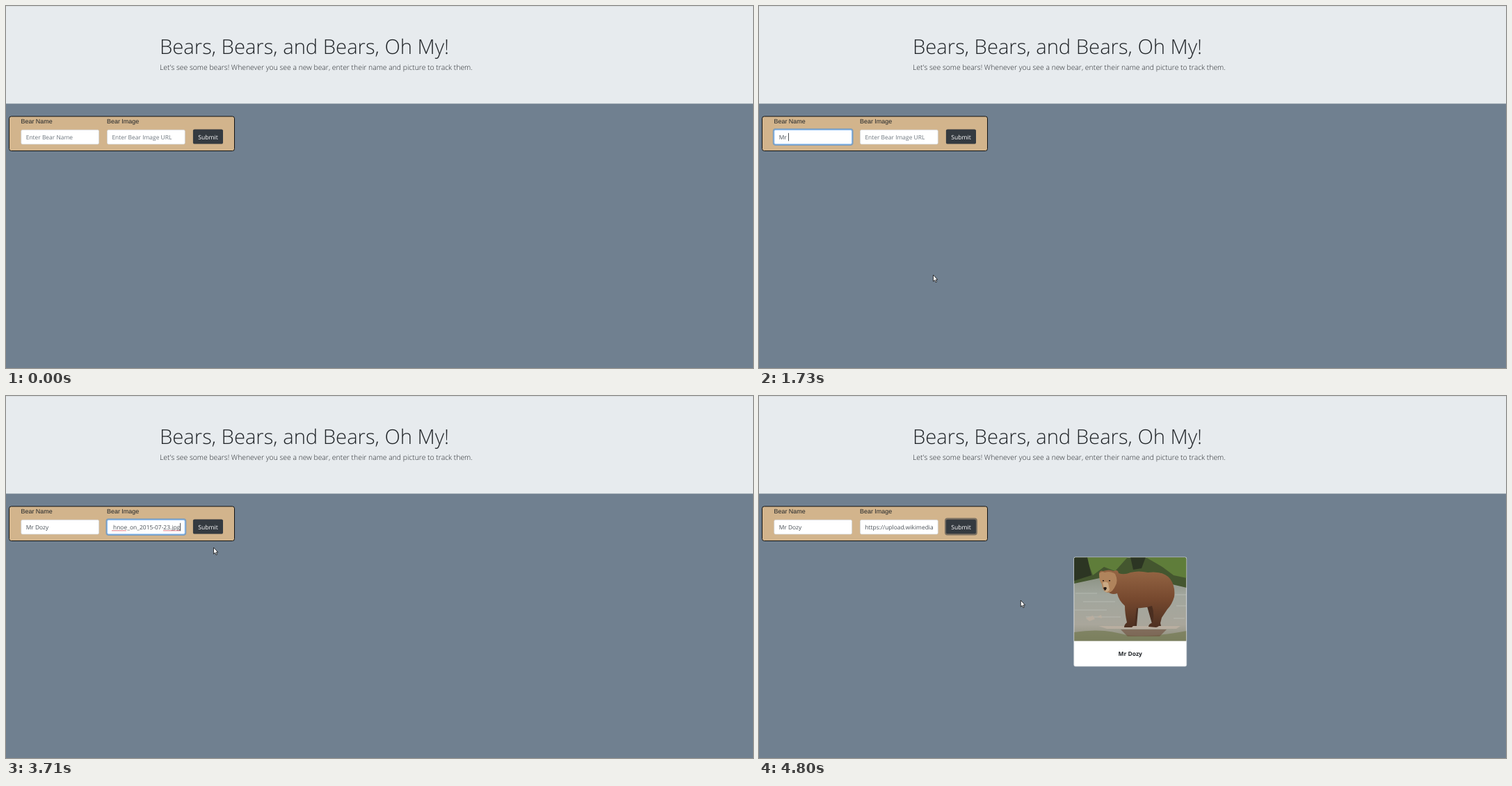
Animation of 1074 by 521 pixels, one loop 5320 ms. Source, as an HTML page:

```html
<!DOCTYPE html>
<html lang="en">
<head>
<meta charset="utf-8">
<title>Bear tracker</title>
<style>
  html, body { margin: 0; width: 100%; height: 100%; overflow: hidden; background: #708090; }
  svg { display: block; }
  text { font-family: "Open Sans", "Noto Sans", sans-serif; font-size: 8.45px; fill: #495057;
         white-space: pre; text-rendering: geometricPrecision; }
  .light { font-weight: 300; fill: #212529; }
  .label { font-family: "Liberation Sans", Arial, sans-serif; font-size: 8.95px; fill: #212529; }
  .hint { fill: #6c757d; }
  .field { fill: #fff; stroke: #ced4da; stroke-width: .7; }
  .ring { fill: none; stroke: #007bff; stroke-opacity: .4; stroke-width: 2; }
  .edge { fill: none; stroke: #80bdff; stroke-width: .8; }
  .caret { fill: #343a40; }
  .pointer { stroke: #111; stroke-width: .8; fill: #fff; stroke-linejoin: round; }
</style>
</head>
<body>
<svg width="1074" height="521" viewBox="0 0 1074 521">
  <defs>
    <clipPath id="photo"><path d="M453.2 352.5V234q0-1.6 1.6-1.6H612.600q1.600 0 1.600 1.600V352.500Z"/></clipPath>
    <linearGradient id="water" x2="0" y2="1">
      <stop offset="0" stop-color="#777f6b"/>
      <stop offset=".45" stop-color="#a1a69d"/>
      <stop offset=".8" stop-color="#a9a69b"/>
      <stop offset="1" stop-color="#8b8c79"/>
    </linearGradient>
    <linearGradient id="fur" x2="0" y2="1">
      <stop offset="0" stop-color="#946543"/>
      <stop offset=".5" stop-color="#77492f"/>
      <stop offset="1" stop-color="#4d3021"/>
    </linearGradient>
  </defs>

  <rect width="1074" height="521" fill="#708090"/>
  <rect width="1074" height="140.500" fill="#e7ebee"/>
  <rect width="1074" height="1" fill="#d9dde0"/>
  <text class="light" x="221" y="68.500" style="font-size:29.200px">Bears, Bears, and Bears, Oh My!</text>
  <text class="light" x="221" y="91.700" style="font-size:10.400px">Let's see some bears! Whenever you see a new bear, enter their name and picture to track them.</text>

  <rect x="4.500" y="158.900" width="324" height="49.600" rx="3" fill="#d2b48c" stroke="#111"/>
  <text class="label" x="21.500" y="169.400">Bear Name</text>
  <text class="label" x="145" y="169.400">Bear Image</text>

  <g id="name" transform="translate(21.500 178)"></g>
  <g id="link" transform="translate(145.200 178)"></g>
  <g id="marks" fill="none" stroke="#d04050" stroke-width=".7">
    <path d="M152 193.800H173M226 193.800H250"/>
  </g>

  <rect id="halo" x="268" y="176.600" width="44.900" height="23" rx="3" fill="none" stroke="#343a40" stroke-opacity=".55" stroke-width="2"/>
  <rect id="button" x="268.900" y="177.400" width="43.100" height="21.200" rx="2.200"/>
  <text x="290.500" y="191.500" text-anchor="middle" style="fill:#fff;font-size:8.600px">Submit</text>

  <g id="card">
    <rect x="452.800" y="231.900" width="161.900" height="157.200" rx="2.200" fill="#fff" stroke="#d5d9dd" stroke-width=".7"/>
    <g clip-path="url(#photo)">
      <rect x="453" y="232" width="162" height="121" fill="url(#water)"/>
      <path fill="#44562f" d="M453 232H615V276L598 272 560 262 520 268 490 262 453 270Z"/>
      <path fill="#5f7d3a" d="M470 232H530L512 252 496 246 480 258ZM556 232H615V262L596 258 580 246Z"/>
      <path fill="#2c3523" d="M453 232H472L478 258 453 266ZM534 232H556L550 248 538 250Z"/>
      <g fill="none" stroke="#c2c6bf" stroke-width="1.200" opacity=".6">
        <path d="M455 284H486M466 296H512M454 308H500M598 286H614M600 302H615M470 318H520M596 320H612"/>
      </g>
      <path fill="#747952" opacity=".7" d="M453 340Q490 334 520 342T615 338V353H453Z"/>
      <path fill="#70523f" opacity=".65" d="M520 336H586L576 346H530Z"/>
      <path fill="#b9aea0" d="M470 320l10-4 3 5-8 3ZM486 318l6-3 1 5ZM488 331H606L600 335H500Z"/>
      <path fill="#4a2e20" d="M531 298L546 296 543 331H533ZM556 296L580 300 575 318 578 331H566Z"/>
      <path fill="url(#fur)" d="M489 255q1-5 6-3 8-3 15 0 6-3 7 3 8 3 17-1 12-3 25 0 22-3 32 9 8 11 6 26-3 11-10 18l-8 12-2 8q-1 5-6 6l-11-1q0-4 6-6 3-13-1-24-11 4-22 3-2 12-3 24l-4 4h-11q0-4 4-7-3-13-3-24-9-8-11-18-5 2-10 0-7-3-10-10-4-7-6-19Z"/>
      <path fill="#b0845c" d="M489 256q3-5 8-2 8-3 15 2 5 10 0 18-4 9-11 9-7-1-8-12-4-5-4-15Z"/>
      <path fill="#c9a984" d="M494 269q4-3 8 0l2 10q-3 5-7 2Z"/>
      <path fill="#241913" d="M495 276q3-2 5 0-1 4-3 4ZM494 265h2v1.500h-2ZM503 265h2v1.500h-2Z"/>
    </g>
    <text id="title" x="533.700" y="374.200" text-anchor="middle" style="fill:#212529;font-weight:700"></text>
  </g>

  <g id="cursor" class="pointer">
    <path id="arrow" d="M0 0V9.300L2.100 7.400 3.500 10.700 5 10.100 3.600 6.900H6.300Z"/>
    <path id="beam" fill="none" d="M-2.500-5.500H-.6L0-5 .6-5.500H2.500M0-5V5M-2.500 5.500H-.6L0 5 .6 5.500H2.500"/>
    <path id="hand" d="M-1 1Q0-.8 1 1V5Q2 4 3 5.200 4 4.500 4.800 5.700 6.200 5.200 6.300 7V9.500L5 13H-.5L-3.600 8.500Q-3.500 6.700-1.800 7.600L-1 8.500Z"/>
  </g>
</svg>
<script>
const LOOP = 5320;
const NAME = 'Mr Dozy';
const $ = id => document.getElementById(id);

// Latest value whose start time has passed.
const at = (steps, t) => {
  let value = steps[0][1];
  for (const [start, v] of steps) if (t >= start) value = v;
  return value;
};

// Evenly timed hops, snapped to the 10 ms clock.
const hops = (from, to, points) => points.map((p, i) =>
  [Math.round((from + (to - from) * i / (points.length - 1)) / 10) * 10, p]);

const route = [
  [0, null],
  ...hops(70, 540, [[606, 410], [566, 382], [446, 322], [292, 262], [150, 220], [62, 196], [33, 193]]),
  ...hops(620, 940, [[46.5, 189.7], [48, 190], [92, 236], [196, 340], [250.500, 387]]),
  ...hops(2600, 3080, [[264, 368], [246, 312], [207.500, 253], [194, 206], [188, 176], [196, 180], [208, 187]]),
  ...hops(3170, 3630, [[210, 187], [211, 187], [212, 188], [222, 208], [246, 236], [276, 250], [294, 229]]),
  ...hops(3710, 4180, [[298.500, 218], [298, 211], [297, 203], [296, 194], [295.500, 189], [295.500, 188], [295.500, 188]]),
  ...hops(4550, 4800, [[306, 204], [346, 254], [388, 291], [376.300, 294]])
];

const typed = [[0, 0], [1420, 1], [1650, 2], [1730, 3], [1970, 4], [2050, 5], [2210, 6], [2290, 7]];
const nameFocus = [[0, 0], [700, .5], [780, 1], [3170, .5], [3250, 0]];
const nameCaret = [[0, 0], [700, 1], [1190, 0], [1420, 1], [2840, 0]];
const linkText = [[0, ''], [3320, 'hnoe_on_2015-07-23.jpg'], [4180, 'https://upload.wikimedia']];
const linkFocus = [[0, 0], [3170, .5], [3250, 1], [4270, .65], [4340, 0]];
const linkCaret = [[0, 0], [3170, 1], [3870, 0]];
const buttonFill = [[0, '#343a40'], [3950, '#2b3035'], [4020, '#23272b'], [4550, '#2b3035'], [4630, '#343a40']];
const haloFocus = [[0, 0], [4340, .6], [4410, 1]];

function makeField(id, hint) {
  const g = $(id);
  g.innerHTML = `<rect class="field" x=".3" y=".3" width="111.800" height="20.600" rx="2"/>
    <g><rect class="ring" x="-.7" y="-.7" width="113.800" height="22.600" rx="2.800"/>
    <rect class="edge" x=".4" y=".4" width="111.600" height="20.400" rx="2"/></g>
    <text x="7.200" y="13.800"></text><rect class="caret" y="4.800" width=".9" height="11.500"/>`;
  const [, focus, text, caret] = g.children;
  return (value, glow, blink, fromEnd) => {
    const shown = value || hint;
    if (text.textContent !== shown) text.textContent = shown;
    text.setAttribute('class', value ? '' : 'hint');
    text.setAttribute('text-anchor', fromEnd ? 'end' : 'start');
    text.setAttribute('x', fromEnd ? 105 : 7.2);
    focus.style.opacity = glow;
    caret.style.opacity = blink;
    caret.setAttribute('x', fromEnd ? 105 : value ? 7.2 + text.getComputedTextLength() : 6.8);
  };
}

const drawName = makeField('name', 'Enter Bear Name');
const drawLink = makeField('link', 'Enter Bear Image URL');
$('title').textContent = NAME;

const show = (id, on) => { $(id).style.display = on ? '' : 'none'; };
const inside = ([x, y], left, right) => x > left && x < right && y > 178 && y < 199;

function drawCursor(pos) {
  show('cursor', pos);
  if (!pos) return;
  const beam = inside(pos, 22, 134) || inside(pos, 145, 257);
  const hand = inside(pos, 269, 312);
  show('beam', beam);
  show('hand', hand);
  show('arrow', !beam && !hand);
  $('cursor').setAttribute('transform', `translate(${pos})`);
}

function draw(t) {
  const link = at(linkText, t);
  const pasted = link.startsWith('hnoe');
  drawName(NAME.slice(0, at(typed, t)), at(nameFocus, t), at(nameCaret, t), false);
  drawLink(link, at(linkFocus, t), at(linkCaret, t), pasted);
  show('marks', pasted);
  $('button').setAttribute('fill', at(buttonFill, t));
  $('halo').style.opacity = at(haloFocus, t);
  show('card', t >= 4340);
  drawCursor(at(route, t));
}

const begin = performance.now();
function tick() {
  draw((performance.now() - begin) % LOOP);
  requestAnimationFrame(tick);
}
tick();
</script>
</body>
</html>
```
